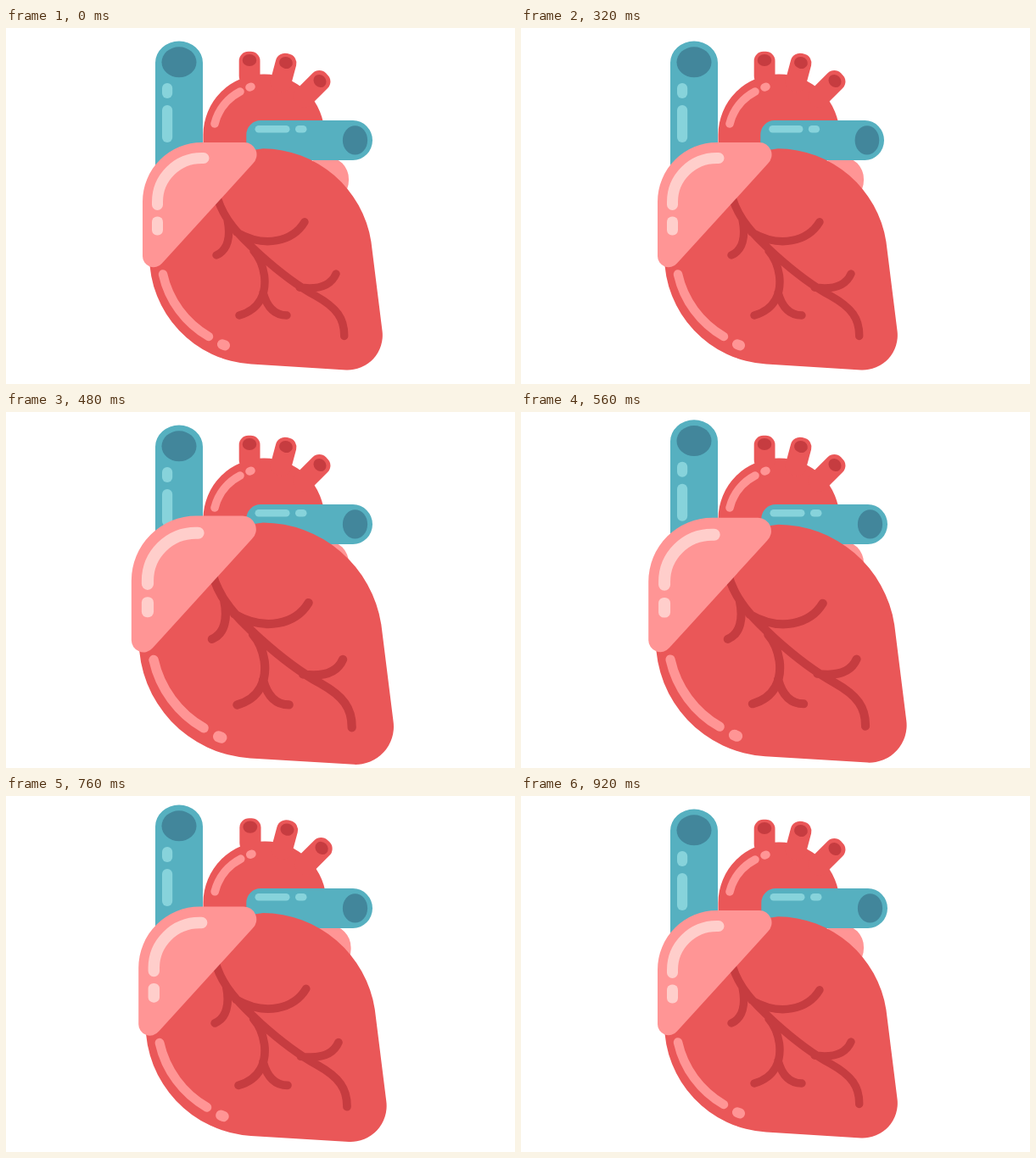
These frames come from a looping animation (600 by 420 pixels, 0.96 s). An HTML page:

```html
<!DOCTYPE html>
<html lang="en">
<head>
<meta charset="utf-8">
<title>Beating heart</title>
<style>
  html, body { margin: 0; width: 100%; height: 100%; overflow: hidden; background: #fff; }
  svg { display: block; width: 600px; height: 420px; }
  .red { fill: #ea5758; }
  .pink { fill: #ff9595; }
  .pale { fill: #ffcecb; }
  .dark { fill: #c63c40; }
  .blue { fill: #56b0c0; }
  .sky { fill: #87d3db; }
  .deep { fill: #42869b; }
  .line { fill: none; stroke-linecap: round; stroke-linejoin: round; }
</style>
</head>
<body>
<svg viewBox="0 0 600 420">
  <g id="aorta">
    <rect class="pink" x="350" y="152" width="54" height="54" rx="26"/>
    <path class="red" d="M232.5 150V126A71.5 71.5 0 0 1 375.5 126V150Z"/>
    <g transform="translate(287 38)">
      <rect class="red" x="-12.3" y="-10.3" width="24.8" height="40" rx="11"/>
      <ellipse class="dark" rx="8.3" ry="7"/>
    </g>
    <g transform="translate(330 41) rotate(15)">
      <rect class="red" x="-12.3" y="-11" width="24.8" height="46" rx="11"/>
      <ellipse class="dark" rx="8" ry="7"/>
    </g>
    <g transform="translate(370 62.5) rotate(45)">
      <rect class="red" x="-12.5" y="-11.5" width="25" height="50" rx="11"/>
      <ellipse class="dark" rx="8" ry="7"/>
    </g>
    <path class="line" stroke="#ff9595" stroke-width="9.5" d="M246 113A59 59 0 0 1 276 75M287 70L289 69.3"/>
  </g>

  <g id="vein">
    <path class="blue" d="M176 200V41A28 25.5 0 0 1 232 41V200Z"/>
    <ellipse class="deep" cx="204" cy="40.3" rx="20.5" ry="18"/>
    <rect class="sky" x="184" y="65" width="12.2" height="18" rx="6"/>
    <rect class="sky" x="184" y="91" width="12.2" height="44" rx="6"/>
  </g>
  <path id="spurt" class="line" stroke="#ea5758" stroke-width="5" d="M194.5 1L198 5.5M205.5 -3L207.3 2L209.5 -3M220.5 1L216.5 5.5"/>

  <g id="artery">
    <path class="blue" d="M283.3 156V126A17 17 0 0 1 300.3 109H409A23 23.5 0 0 1 409 156Z"/>
    <ellipse class="deep" cx="411.5" cy="132.4" rx="14.6" ry="17.2"/>
    <rect class="sky" x="293.5" y="115" width="41" height="8.6" rx="4.3"/>
    <rect class="sky" x="341" y="115" width="13.5" height="8.6" rx="4.3"/>
  </g>

  <g id="heart">
    <path class="red" d="M169 269A128 128 0 0 0 289 396.6L401 403.4A41 41 0 0 0 443.5 357L430.4 252A130 130 0 0 0 303 142.3L250 150L172 240Z"/>
    <path class="line" stroke="#c63c40" stroke-width="9.4" d="M248 196C255 225 275 245 300 268C320 286 345 305 365 316C390 330 399 343 398.7 363.5
      M248 268C262 262 265 245 261 226
      M352 228.8C338 252 305 260 272 241
      M275 339C300 332 307 312 304.500 292C303 282 300 272 292 263
      M331 339C315 339 307 327 303 312
      M389 290C383 304 368 309 346 306"/>
    <path class="line" stroke="#ff9595" stroke-width="10.5" d="M185 290.500A113 113 0 0 0 239 364"/>
    <path class="line" stroke="#ff9595" stroke-width="12" d="M255 373.2L258 374.4"/>
    <path class="pink" d="M161 205A70 70 0 0 1 231 135H281A14.500 14.500 0 0 1 291 160L184 277.500A13 13 0 0 1 161 269Z"/>
    <path class="line" stroke="#ffcecb" stroke-width="13" d="M178.500 208.500V205A52 51.500 0 0 1 230.500 153.500H233"/>
    <rect class="pale" x="172" y="222.500" width="13" height="22" rx="6"/>
  </g>
</svg>
<script>
  const LOOP = 960, STEP = 40;
  const part = id => document.getElementById(id);
  const [aorta, vein, spurt, artery, heart] =
    ["aorta", "vein", "spurt", "artery", "heart"].map(part);

  // Linear rise from 0 to 1 and back
  const pulse = (t, start, peak, end) =>
    Math.max(0, Math.min((t - start) / (peak - start), (end - t) / (end - peak)));

  const scaleAt = (el, x, y, sx, sy) =>
    el.setAttribute("transform", `translate(${x} ${y}) scale(${sx} ${sy}) translate(${-x} ${-y})`);

  const slide = (el, y) => el.setAttribute("transform", `translate(0 ${y})`);

  function draw(t) {
    const squeeze = t < 120 ? 0 : pulse(t, 80, 240, 440);
    scaleAt(artery, 232, 132, 1 - 0.0333 * squeeze, 1);

    const beat = 1 + 0.093 * pulse(t, 320, 480, 920);
    scaleAt(heart, 302.5, 269.3, beat, beat);

    const lift = pulse(t, 480, 640, 840);
    slide(vein, -12.4 * lift);
    slide(spurt, 12.4 * (1 - lift));
    spurt.style.visibility = t >= 600 && t <= 640 ? "visible" : "hidden";

    const swell = 1 + 0.02 * pulse(t, 640, 800, 920);
    scaleAt(aorta, 232, 130, swell, swell);
  }

  const begin = performance.now();
  function tick() {
    const t = (performance.now() - begin) % LOOP;
    draw(Math.floor(t / STEP) * STEP);
    requestAnimationFrame(tick);
  }
  tick();
</script>
</body>
</html>
```
